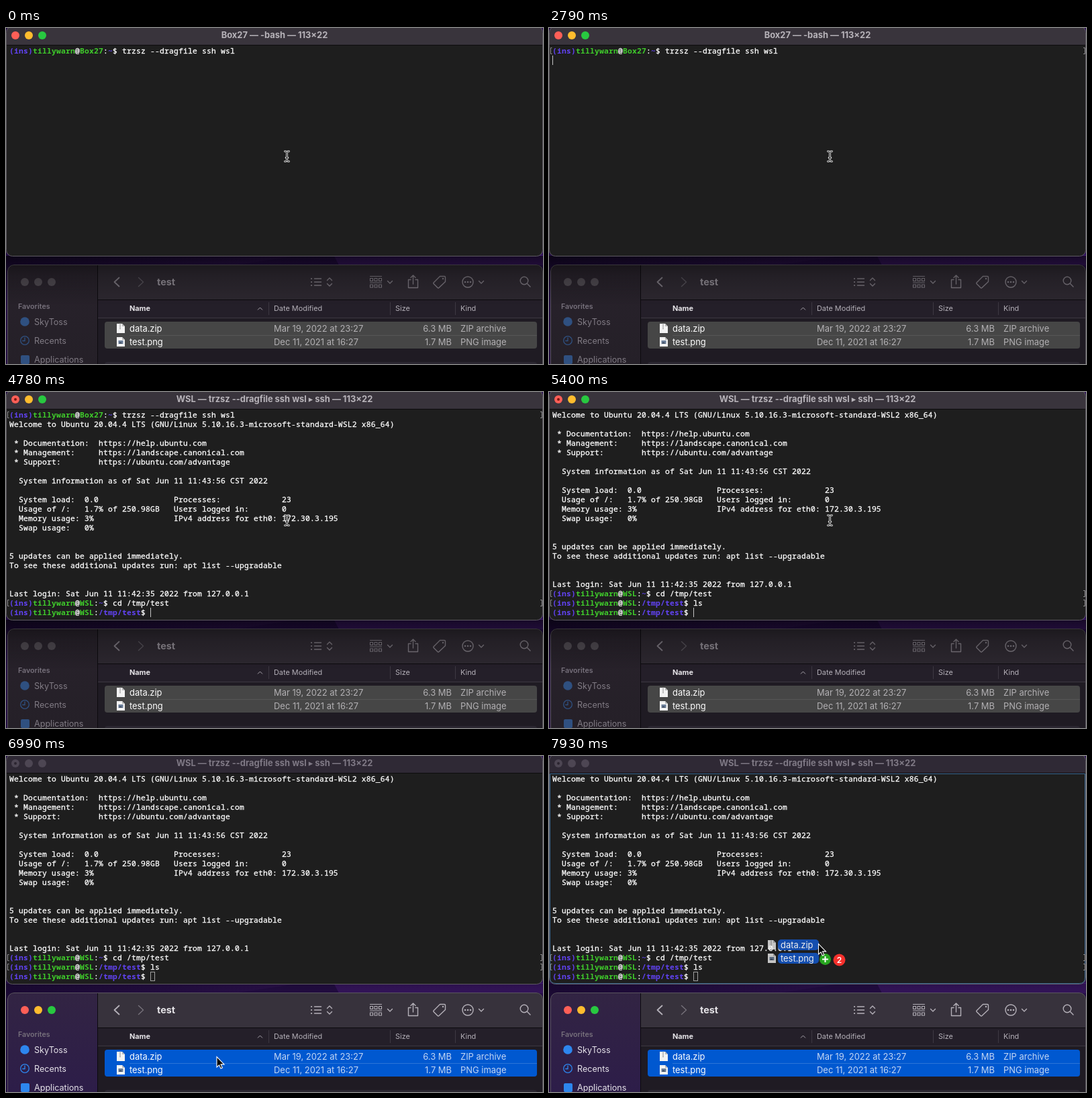
An HTML page that plays this animation: 800 by 500 pixels, repeating every 8000 ms.

```html
<!DOCTYPE html>
<html lang="en">
<head>
<meta charset="utf-8">
<title>Terminal and file window</title>
<style>
html, body { margin: 0; width: 100%; height: 100%; overflow: hidden; background: #1c0b36; }
svg {
  display: block; width: 800px; height: 500px; font-family: Inter, "DejaVu Sans", sans-serif;
  --bar: #39343c; --title: #b7b3b9; --r: #fe5f57; --y: #febc2e; --g: #28c840; --busy: #7d1510;
  --fr: #4d484f; --fy: #4d484f; --fg: #4d484f;
  --side1: #28222b; --side2: #252028; --tool: #2d2830; --icon: #7b767e; --name: #8d8890;
  --item: #807b84; --blue: #2f5080; --sel: #464646; --meta: #b2b0b3; --line: #565656; --shade: 1;
}
svg.finder {
  --bar: #2f2935; --title: #7f7985; --r: #4d4653; --y: #4d4653; --g: #4d4653; --busy: #2b2530;
  --fr: #fe5f57; --fy: #febc2e; --fg: #28c840;
  --side1: #322443; --side2: #2d1d49; --tool: #37323c; --icon: #b4b0b8; --name: #e4e2e6;
  --item: #e6e3ea; --blue: #2d86ee; --sel: #0058d0; --meta: #c3d6f4; --line: #2c74d8; --shade: 0;
}
#rows text, #rows tspan { white-space: pre; }
#rows { font: 500 11.3px "Noto Sans Mono", "DejaVu Sans Mono", monospace; letter-spacing: .22px; fill: #fff; stroke: #fff; stroke-width: .3; }
.v { fill: #6243f5; font-weight: 700; stroke: none; }
.u { fill: #3fcb2b; font-weight: 700; stroke: none; }
.ic { fill: none; stroke: var(--icon); stroke-width: 1.4; stroke-linecap: round; stroke-linejoin: round; }
.dot { fill: var(--icon); }
</style>
</head>
<body>
<svg id="stage" viewBox="0 0 800 500">
  <defs>
    <linearGradient id="desk"><stop stop-color="#210c40"/><stop offset=".55" stop-color="#34145c"/><stop offset="1" stop-color="#2e1158"/></linearGradient>
    <linearGradient id="side" x2="0" y2="1"><stop style="stop-color:var(--side1)"/><stop offset="1" style="stop-color:var(--side2)"/></linearGradient>
    <linearGradient id="shade" x2="0" y2="1"><stop stop-opacity=".5"/><stop offset=".4" stop-opacity=".22"/><stop offset="1" stop-opacity="0"/></linearGradient>
    <clipPath id="fclip"><path d="M2 510V362a10 10 0 0 1 10-10H790a10 10 0 0 1 10 10V510Z"/></clipPath>
    <g id="zip">
      <path d="M0 0H8L12 4V14H0Z" fill="#f3f3f3"/><path d="M8 0V4H12Z" fill="#b9b9b9"/>
      <path d="M5 1V8" stroke="#777" stroke-width="1.6" stroke-dasharray="1 1"/>
    </g>
    <g id="png">
      <path d="M0 0H8L12 4V14H0Z" fill="#f3f3f3"/><path d="M8 0V4H12Z" fill="#b9b9b9"/>
      <rect x="2.5" y="5" width="7" height="5" fill="#6c7f99"/><path d="M3 9.5 5 7.5 9 9.5Z" fill="#2e3c50"/>
    </g>
    <path id="ibeam" d="M-3-7.5Q0-7.5 0-5.5Q0-7.5 3-7.5M0-5.5V5.5M-3 7.5Q0 7.5 0 5.5Q0 7.5 3 7.5M-1.5 2H1.5"/>
  </defs>

  <rect width="800" height="500" fill="url(#desk)"/>
  <path d="M488 338H800V353H496Z" fill="#40196f"/>
  <path d="M340 353 440 338H488L496 353Z" fill="#2a0f50"/>
  <rect y="339" width="800" height="60" fill="url(#shade)" opacity=".6"/>

  <g clip-path="url(#fclip)">
    <rect y="352" width="800" height="148" fill="#1f1b23"/>
    <rect y="352" width="136" height="148" fill="url(#side)"/>
    <rect x="137" y="352" width="663" height="52" fill="var(--tool)"/>
    <rect x="137" y="405" width="663" height="26" fill="#241f29"/>
    <path d="M136.5 352V500M137 404.5H800" stroke="#0c0a0e"/>
    <path d="M137 431.5H800M391.5 408V427M572.5 408V427M669.5 408V427" stroke="#3d3842"/>
    <rect x="147" y="497" width="644" height="10" rx="4" fill="#2a2630"/>
    <circle cx="28" cy="378" r="6" fill="var(--fr)"/><circle cx="48" cy="378" r="6" fill="var(--fy)"/><circle cx="68" cy="378" r="6" fill="var(--fg)"/>

    <circle cx="28" cy="437" r="6.8" fill="var(--blue)"/>
    <g fill="none" style="stroke:var(--blue)" stroke-width="1.3" stroke-linecap="round">
      <circle cx="28" cy="465" r="6.3"/><path d="M28 461V465.5H24.8"/>
    </g>
    <rect x="22" y="487" width="13" height="13" rx="2" fill="var(--blue)"/>

    <path class="ic" d="M168.5 371.5 161.5 378 168.5 384.5" style="stroke-width:1.8"/>
    <path class="ic" d="M197.5 371.5 204.5 378 197.5 384.5" opacity=".5"/>
    <path class="ic" d="M459.5 373H469.5M459.5 378H469.5M459.5 383H469.5M478.5 375.5 482 372 485.5 375.5M478.5 380.5 482 384 485.5 380.5"/>
    <path class="ic" d="M455 373h.1M455 378h.1M455 383h.1" style="stroke-width:2.2"/>
    <path class="ic" d="M542.5 369.5H559.5M542.5 379H559.5" style="stroke-width:1.1"/>
    <g id="grid" class="ic" style="stroke-width:1.1"></g>
    <path class="ic" d="M568.5 376.5 572 380 575.5 376.5M704.5 376.5 708 380 711.5 376.5"/>
    <path class="ic" d="M603 374.5H599.5V386.5H613.5V374.5H610M606.5 381V368.5M603 371.5 606.5 368 610 371.5"/>
    <path class="ic" d="M637 379 646.5 369.5H653Q654.5 369.5 654.5 371V377.5L645 386.5Q644 387.5 643 386.5L637 380.5Q636.3 379.8 637 379Z"/>
    <circle class="dot" cx="651" cy="373" r="1.2"/>
    <circle class="ic" cx="688" cy="378" r="8"/>
    <circle class="dot" cx="684" cy="378" r="1.3"/><circle class="dot" cx="688" cy="378" r="1.3"/><circle class="dot" cx="692" cy="378" r="1.3"/>
    <circle class="ic" cx="772" cy="376" r="5.8"/><path class="ic" d="M776.3 380.3 781 385"/>
    <path d="M375 419.5 378.5 416 382 419.5" fill="none" stroke="#a9a5ad"/>

    <rect x="147" y="437" width="644" height="40" rx="4" fill="var(--sel)"/>
    <path d="M184 457.5H791" style="stroke:var(--line)"/>
    <use href="#zip" x="165" y="440"/><use href="#png" x="165" y="460"/>
    <g id="labels"></g>
    <path d="M2.5 500V362a9.5 9.5 0 0 1 9.5-9.5H790a9.5 9.5 0 0 1 9.5 9.5V500" fill="none" stroke="#5a555e"/>
  </g>
  <rect y="339" width="800" height="75" fill="url(#shade)" style="opacity:var(--shade)"/>

  <g id="term">
    <rect x=".5" y="-2.5" width="799" height="342" rx="9" fill="#1e1e1e"/>
    <path d="M1 25V6Q1-2 9-2H791Q799-2 799 6V25Z" fill="var(--bar)"/>
    <path d="M1 25.5H799" stroke="#0d0c0e"/>
    <rect x=".5" y="-2.5" width="799" height="342" rx="9" fill="none" stroke="#5d5961"/>
    <circle cx="14" cy="11" r="6" fill="var(--r)"/><circle cx="34" cy="11" r="6" fill="var(--y)"/><circle cx="54" cy="11" r="6" fill="var(--g)"/>
    <circle id="busy" cx="14" cy="11" r="2" fill="var(--busy)"/>
    <text id="title" x="400" y="15.3" font-size="12.9" font-weight="700" text-anchor="middle" fill="var(--title)"/>
    <path id="drop" d="M1.5 26.5H798.5V330Q798.5 338.5 790 338.5H10Q1.5 338.5 1.5 330Z" fill="none" stroke="#3d6a94"/>
    <g id="rows"></g>
    <path id="marks" fill="none" stroke="#8c8c8c"/>
    <rect id="caret" width="1" height="14" fill="#c4c4c4"/>
    <rect id="box" width="6" height="13" fill="none" stroke="#a0a0a0"/>
  </g>

  <g id="drag">
    <g id="items" opacity=".93">
      <rect x="-4" y="-8" width="61" height="16" rx="5" fill="#1452ba"/>
      <rect x="-4" y="12" width="61" height="16" rx="5" fill="#1452ba"/>
      <use href="#zip" x="-19" y="-7" opacity=".85"/><use href="#png" x="-19" y="13" opacity=".85"/>
      <g fill="#fff" font-size="12.9"><text y="4.5">data.zip</text><text y="24.5">test.png</text></g>
    </g>
    <g id="badges">
      <g id="plus"><circle cx="10" cy="23" r="8.5" fill="#27a51f"/><path d="M5.5 23H14.5M10 18.5V27.5" stroke="#fff" stroke-width="2"/></g>
      <circle cx="31" cy="24" r="9" fill="#f5302c"/>
      <text x="31" y="28.3" font-size="12" font-weight="600" text-anchor="middle" fill="#fff">2</text>
    </g>
  </g>
  <g id="beam" fill="none" stroke-linecap="round">
    <use href="#ibeam" stroke="#fff" stroke-width="2.6"/>
    <use href="#ibeam" stroke="#111"/>
  </g>
  <path id="arrow" d="M0 0V15.5L3.6 12.3 6 17.6 8.4 16.5 6 11.4H11Z" fill="#000" stroke="#fff" stroke-width="1.1"/>
</svg>
<script>
const $ = id => document.getElementById(id);
const put = (el, k, v) => { if (el.getAttribute(k) !== String(v)) el.setAttribute(k, v); };
const show = (el, on) => put(el, 'visibility', on ? 'visible' : 'hidden');
const move = (el, x, y) => put(el, 'transform', `translate(${x} ${y})`);
const lerp = (a, b, k) => a + (b - a) * k;
const ease = k => (k = Math.min(1, Math.max(0, k)), k * k * (3 - 2 * k));

// Finder labels: x, centre y, size, colour, text, weight, anchor
const label = (x, y, size, fill, text, weight = 400, anchor = 'start') =>
  `<text x="${x}" y="${y + size * .36}" font-size="${size}" font-weight="${weight}" text-anchor="${anchor}" style="fill:${fill}">${text}</text>`;
const file = (y, name, date, size, kind) =>
  label(184, y, 12.9, '#fff', name) + label(399, y, 12.95, 'var(--meta)', date) +
  label(664, y, 12.95, 'var(--meta)', size, 400, 'end') + label(677, y, 12.95, 'var(--meta)', kind);
$('labels').innerHTML =
  label(225, 378, 14.4, 'var(--name)', 'test', 700) +
  label(18, 414, 10.7, '#77717c', 'Favorites', 600) +
  ['SkyToss', 'Recents', 'Applications'].map((s, i) => label(42, 437.5 + 28 * i, 12.6, 'var(--item)', s)).join('') +
  label(184, 417, 10.9, '#e6e4e8', 'Name', 700) +
  [[399, 'Date Modified'], [580, 'Size'], [677, 'Kind']].map(([x, s]) => label(x, 417, 10.9, '#b3afb7', s)).join('') +
  file(447, 'data.zip', 'Mar 19, 2022 at 23:27', '6.3 MB', 'ZIP archive') +
  file(467, 'test.png', 'Dec 11, 2021 at 16:27', '1.7 MB', 'PNG image');
let cells = '';
for (let i = 0; i < 6; i++)
  cells += `<rect x="${542.5 + i % 3 * 6.5}" y="${i < 3 ? 372.5 : 382}" width="4" height="4"/>`;
$('grid').innerHTML = cells;

// Terminal content
const user = 'tillywarn';
const prompt = (host, path, cmd, marked) => ({
  html: `<tspan class="v">(ins)</tspan><tspan class="u">${user}</tspan>@<tspan class="u">${host}</tspan>:<tspan class="v">${path}</tspan>$ ${cmd}`,
  cols: '(ins)@:$ '.length + user.length + host.length + path.length + cmd.length,
  marked
});
const link = (name, url) => ` * ${name}:`.padEnd(19) + 'https://' + url;
const stat = (name, value, more = '', end = '') =>
  (`  ${name}:`.padEnd(16) + value).padEnd(35) + more.padEnd(23) + end;
const welcome = [
  'Welcome to Ubuntu 20.04.4 LTS (GNU/Linux 5.10.16.3-microsoft-standard-WSL2 x86_64)', '',
  link('Documentation', 'help.ubuntu.com'),
  link('Management', 'landscape.canonical.com'),
  link('Support', 'ubuntu.com/advantage'), '',
  '  System information as of Sat Jun 11 11:43:56 CST 2022', '',
  stat('System load', '0.0', 'Processes:', '23'),
  stat('Usage of /', '1.7% of 250.98GB', 'Users logged in:', '0'),
  stat('Memory usage', '3%', 'IPv4 address for eth0:', '172.30.3.195'),
  stat('Swap usage', '0%'), '', '',
  '5 updates can be applied immediately.',
  'To see these additional updates run: apt list --upgradable', '', '',
  'Last login: Sat Jun 11 11:42:35 2022 from 127.0.0.1'
].map(html => ({ html, cols: 0 }));

function cdTyped(t) {
  if (t < 3900) return 0;
  if (t < 4600) return t >= 4240 ? 9 : Math.min(7, 2 + Math.floor((t - 3900) / 57));
  return Math.min(12, 10 + Math.floor((t - 4600) / 60));
}

function screen(t) {
  const lines = [prompt('Box27', '~', 'trzsz --dragfile ssh wsl', t >= 2790)];
  if (t >= 2790 && t < 2910) lines.push({ html: '', cols: 0 });
  if (t >= 2910) lines.push(...welcome, prompt('WSL', '~', 'cd /tmp/test'.slice(0, cdTyped(t)), t >= 4780));
  if (t >= 4780) lines.push(prompt('WSL', '/tmp/test', t < 5280 ? '' : t < 5340 ? 'l' : 'ls', t >= 5400));
  if (t >= 5400) lines.push(prompt('WSL', '/tmp/test', ''));
  return lines.slice(-22);
}

const caretOn = t => t < 2790
  ? (t >= 180 && t < 690) || (t >= 1200 && t < 1680) || (t >= 2220 && t < 2640)
  : t < 6210;

let drawn = '';
function drawTerminal(t, focused) {
  const lines = screen(t), last = lines.length - 1;
  const html = lines.map((l, i) => `<text x="5" y="${38 + 14 * i}">${l.html}</text>`).join('');
  if (html !== drawn) $('rows').innerHTML = drawn = html;
  put($('marks'), 'd', lines.map((l, i) => {
    const y = 29.5 + 14 * i;
    return l.marked ? `M4.5 ${y}H2.5V${y + 9}H4.5M796 ${y}H798.5V${y + 9}H796` : '';
  }).join('') || 'M0 0');
  const x = 5 + 7 * lines[last].cols, y = 27 + 14 * last;
  put($('caret'), 'x', x); put($('caret'), 'y', y);
  put($('box'), 'x', x + .5); put($('box'), 'y', y + .5);
  show($('caret'), focused && caretOn(t));
  show($('box'), !focused);
  show($('busy'), t >= 2910);
  const title = t < 2910 ? 'Box27 — -bash — 113×22' : 'WSL — trzsz --dragfile ssh wsl ▸ ssh — 113×22';
  if ($('title').textContent !== title) $('title').textContent = title;
}

function drawMouse(t) {
  const down = ease((t - 6510) / 340);
  move($('beam'), lerp(418.5, 414, down), lerp(191, 330, down));
  show($('beam'), t < 6850);

  const near = ease((t - 6910) / 80), k = ease((t - 7410) / 520);
  const x = t < 7410 ? lerp(332, 314, near) : lerp(314, 401.5, k);
  const y = t < 7410 ? lerp(415, 447.5, near) : lerp(447.5, 279.5, k);
  const over = t >= 7410 && y < 339;
  move($('arrow'), x, y);
  show($('arrow'), t >= 6910);
  move($('items'), x + lerp(-130, -56.5, k), y + 1.5);
  move($('badges'), x, y);
  show($('drag'), t >= 7410);
  put($('plus'), 'display', over ? 'inline' : 'none');
  show($('drop'), over);
}

const start = performance.now();
function frame() {
  const t = (performance.now() - start) % 8000;
  const focused = t < 6990;
  put($('stage'), 'class', focused ? '' : 'finder');
  drawTerminal(t, focused);
  drawMouse(t);
  requestAnimationFrame(frame);
}
frame();
</script>
</body>
</html>
```
